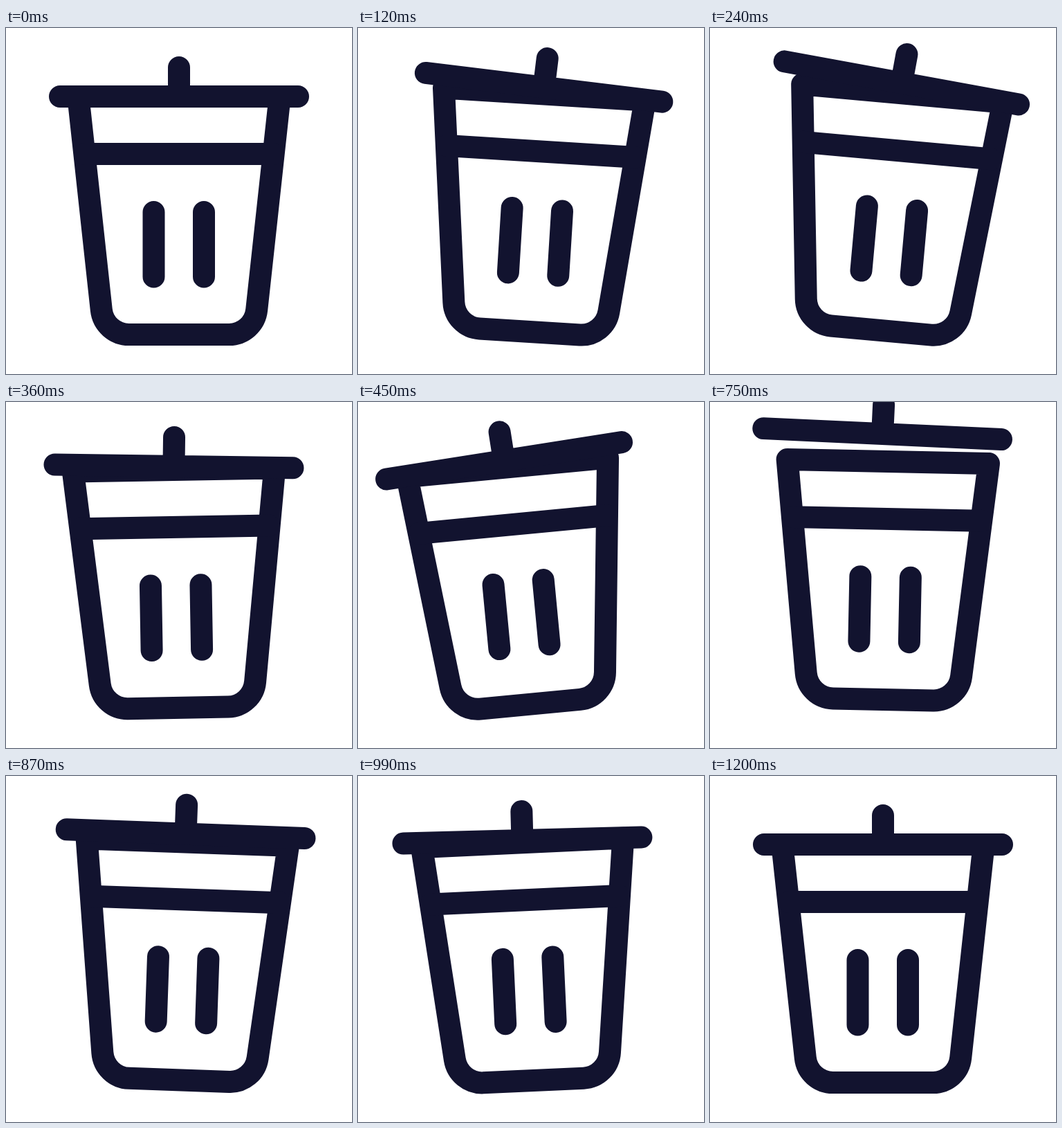
An HTML page for the animation above (1.24 s loop, 500x500 px).

```html
<!DOCTYPE html>
<html lang="en">
<head>
<meta charset="utf-8">
<title>Trash can</title>
<style>
  html, body { margin: 0; width: 100%; height: 100%; overflow: hidden; background: #fff; }
  svg { display: block; width: 100vw; height: 100vh; }
  g { fill: none; stroke: #12132f; stroke-width: 32; stroke-linecap: round; stroke-linejoin: round; }
</style>
</head>
<body>
<svg viewBox="0 0 500 500">
  <g id="can">
    <path d="M104.3 99 L137.8 407.3 A40 40 0 0 0 177.5 443 H322.5 A40 40 0 0 0 362.2 407.3 L395.7 99 Z"/>
    <path d="M114 182 H386 M213.5 266 V359.5 M286 266 V359.5"/>
    <path id="lid" d="M-172 0 H172 M0 -42 V0"/>
  </g>
</svg>
<script>
const LOOP = 1240, STEP = 30, LAST = 1200;
const can = document.getElementById('can');
const lid = document.getElementById('lid');

const clamp = u => Math.min(1, Math.max(0, u));
const ease = u => (1 - Math.cos(Math.PI * clamp(u))) / 2;

// Swings from zero through [ms, value] turning points with sine easing
function swing(t, ...turns) {
  let t0 = 0, v0 = 0, value = 0;
  for (const [t1, v1] of turns) {
    value += (v1 - v0) * ease((t - t0) / (t1 - t0));
    t0 = t1;
    v0 = v1;
  }
  return value;
}

// Ballistic hop of a given height
function hop(t, from, to, height) {
  const u = clamp((t - from) / (to - from));
  return 4 * height * u * (1 - u);
}

function draw(now) {
  const t = Math.min(LAST, Math.floor((now % LOOP) / STEP) * STEP);

  // The can rocks on the bottom corner it leans towards
  const tilt = swing(t, [205, 5.6], [490, -6], [840, 2.5], [990, -2.65], [LAST, 0]);
  const drift = swing(t, [205, 0.8], [550, -6.2], [790, 1.5], [990, 1.75], [LAST, 0]);
  const pivot = 250 + 64 * Math.sign(tilt);
  const jump = hop(t, 505, 880, 13);

  // The lid swings wider, opens on its edge and flies off
  const lidTilt = swing(t, [205, 11], [560, -14.5], [790, 4], [990, -1.5], [1090, 1.2], [LAST, 0]);
  const open = lidTilt - tilt;
  const slide = swing(t, [240, -2.8], [360, 0], [600, -13], [LAST - 200, 0]);
  const lift = 2.85 * Math.abs(open) + hop(t, 560, 900, 36);

  can.setAttribute('transform', `translate(${drift} ${-jump}) rotate(${tilt} ${pivot} 403)`);
  lid.setAttribute('transform', `translate(${250 + slide} ${99 - lift}) rotate(${open})`);
}

const start = performance.now();
function tick() {
  draw(performance.now() - start);
  requestAnimationFrame(tick);
}
tick();
</script>
</body>
</html>
```
